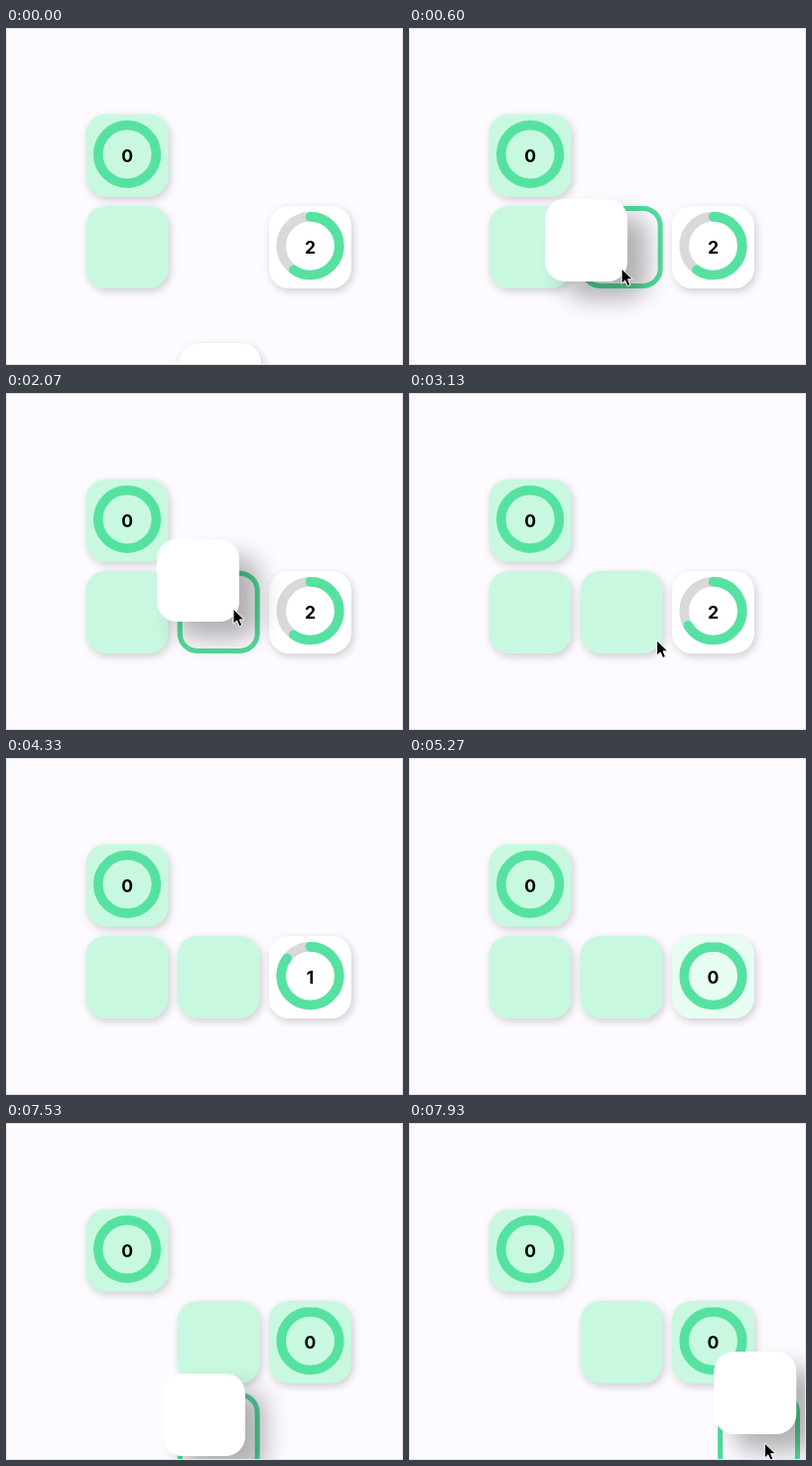
Write an HTML page that moves like this. It is 400 px wide and 339 px high and loops after 8000 ms.

```html
<!DOCTYPE html>
<html lang="en">
<head>
<meta charset="utf-8">
<title>Tile board</title>
<style>
  html, body { margin: 0; width: 100%; height: 100%; overflow: hidden; background: #fdfbff; }
  #stage { position: relative; width: 400px; height: 339px; overflow: hidden; background: #fdfbff; }
  #stage > * { position: absolute; left: 0; top: 0; }
  .tile, .slot { width: 83px; height: 83px; border-radius: 20px; box-sizing: border-box; }
  .slot { border: 5px solid #52dc9b; }
  .tile svg { position: absolute; left: 0; top: 0; }
  .tile text { font: 700 17.5px Inter, "Open Sans", sans-serif; text-anchor: middle; }
  .cursor { z-index: 3; }
  #edge { width: 398px; height: 337px; border: 1px solid #e6e4e8; z-index: 4; }
</style>
</head>
<body>
<div id="stage"></div>
<script>
const LOOP = 8000;
const stage = document.getElementById('stage');
const WHITE = [255, 255, 255], GREEN = [200, 249, 224];
const RING = 2 * Math.PI * 29.3;

const ramp = (t, a, b) => Math.max(0, Math.min(1, (t - a) / (b - a)));
const ease = (t, a, b) => { const u = ramp(t, a, b); return u * u * (3 - 2 * u); };
const mix = (a, b, u) => a + (b - a) * u;
const move = (p, q, u) => p.map((v, i) => mix(v, q[i], u));
const cell = (col, row) => [80.5 + 92.2 * col, 86.7 + 92.2 * row];

// Eased moves in turn: each is [begin, end, goal]
const glide = (t, from, moves) =>
  moves.reduce((pos, [a, b, goal]) => move(pos, goal, ease(t, a, b)), from);

function add(className, html = '') {
  const el = document.createElement('div');
  el.className = className;
  el.innerHTML = html;
  stage.append(el);
  return el;
}

function place(el, [x, y]) {
  el.style.transform = `translate(${x}px, ${y}px)`;
}

// green and lift run from 0 to 1
function paint(el, pos, green, lift) {
  place(el, pos);
  el.style.background = `rgb(${move(WHITE, GREEN, green).map(Math.round)})`;
  el.style.boxShadow = `${mix(2, 20, lift)}px ${mix(3, 17, lift)}px ${mix(9, 25, lift)}px rgba(0,0,0,${mix(0.19, 0.3, lift)})`;
  el.style.zIndex = lift > 0 ? 2 : 0;
}

const dial = `<svg width="83" height="83" fill="none" stroke-width="9.6">
  <circle class="track" cx="41.6" cy="40.3" r="29.3" stroke="#d9d8da"/>
  <circle class="bar" cx="41.6" cy="40.3" r="29.3" stroke="#55e2a0" stroke-linecap="round" transform="rotate(-90 41.6 40.3)"/>
  <text x="41.6" y="48" fill="#000">0</text></svg>`;

function setDial(el, part, number) {
  el.querySelector('.track').style.opacity = part < 1 ? 1 : 0;
  el.querySelector('.bar').setAttribute('stroke-dasharray', part < 1 ? `${RING * part} ${RING}` : 'none');
  el.querySelector('text').textContent = number;
}

const done = add('tile', dial);
const timer = add('tile', dial);
const slot = add('slot');
const first = add('tile');
const second = add('tile');
const cursor = add('cursor', `<svg width="18" height="24" style="display:block;overflow:visible">
  <path d="M0 0V15.2L3.5 11.9L6 17.6L8.8 16.4L6.4 10.8H11.2Z" fill="#000" stroke="#fff" stroke-width="1"/></svg>`);
add('').id = 'edge';

// Pulled up quickly, then swayed in the air and dropped home
function firstAt(t) {
  const pull = Math.exp(-Math.max(0, t - 70) / 277);
  const sway = 10 * Math.cos(2 * Math.PI * (t - 2070) / 2940);
  const held = [142 + sway + 35 * pull, 147 + 170 * pull];
  return move(held, cell(1, 1), ease(t, 2690, 2900));
}

const secondAt = t => glide(t, cell(0, 1), [
  [6950, 7250, [60, 215]], [7400, 7530, [158, 252]], [7530, 8000, [316.5, 228.6]]
]);

const slotAt = t => t < 4000
  ? glide(t, cell(1, 2), [[300, 420, cell(1, 1)]])
  : glide(t, cell(0, 1), [
      [7400, 7500, cell(1, 2)], [7650, 7750, cell(2, 2)], [7881, 7981, cell(3, 2)]
    ]);

// The pointer keeps its grip on the tile being carried
function cursorAt(t) {
  const [tile, grip] = t < 4000 ? [firstAt(t), [77, 70]] : [secondAt(t), [51, 92]];
  const held = tile.map((v, i) => v + grip[i]);
  return t < 4000 ? held : move([153, 311], held, ease(t, 6600, 6900));
}

function draw(t) {
  paint(done, cell(0, 0), 1, 0);
  setDial(done, 1, 0);

  const full = t >= 5270;
  const part = full ? 1 : mix(0.595, 0.999, ramp(t, 2680, 5270));
  paint(timer, cell(2, 1), ramp(t, 5230, 5330), 0);
  setDial(timer, part, full ? 0 : part < 0.8 ? 2 : 1);

  const landed = ease(t, 2690, 2900), picked = ease(t, 6950, 7100);
  paint(first, firstAt(t), landed, ease(t, 70, 200) - landed);
  paint(second, secondAt(t), 1 - picked, picked);

  place(slot, slotAt(t));
  slot.style.opacity = ramp(t, 90, 160) - ramp(t, 2690, 2850) + ramp(t, 6950, 7050);

  place(cursor, cursorAt(t));
  cursor.style.visibility = (t >= 70 && t < 3300) || t >= 6592 ? 'visible' : 'hidden';
}

const start = performance.now();
function tick() {
  draw((performance.now() - start) % LOOP);
  requestAnimationFrame(tick);
}
tick();
</script>
</body>
</html>
```
